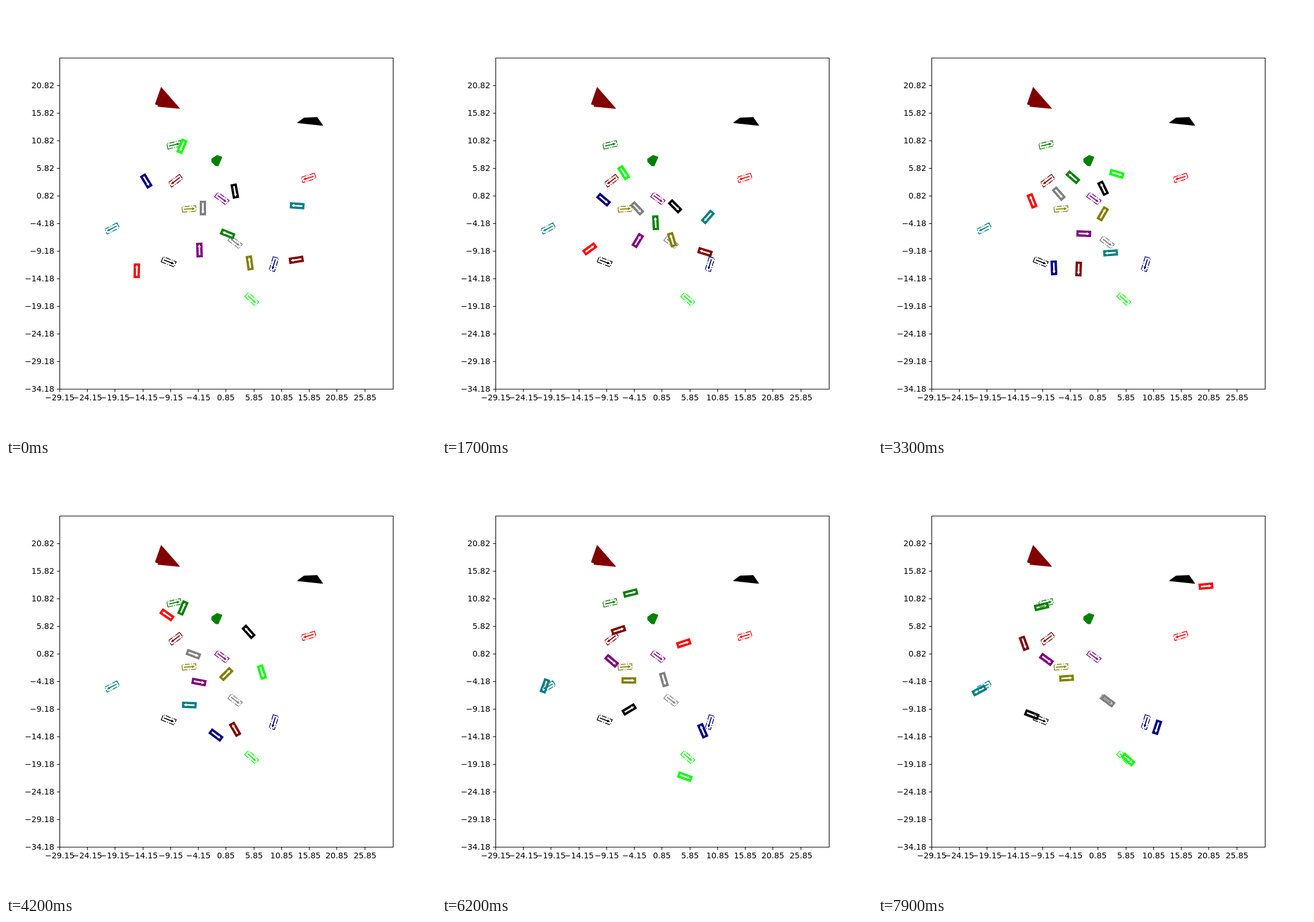
Animation, 748 px wide and 748 px high, one loop 8000 ms. Source, as an HTML page:

```html
<!DOCTYPE html>
<html lang="en">
<head>
<meta charset="utf-8">
<title>Vehicles driving to their goals</title>
<style>
html, body { margin: 0; width: 100%; height: 100%; overflow: hidden; background: #fff; }
svg { display: block; width: 100%; height: 100%; }
text { font: 13.89px "DejaVu Sans", sans-serif; }
</style>
</head>
<body>
<svg id="stage" viewBox="0 0 748 748"></svg>
<script>
const stage = document.getElementById('stage');
const LOOP = 8000, TICK = 100;
const TIMES = [0, 16, 32, 49, 61, 78];
const BOX = 'M-12.05 4.8H12.05V-4.8H-12.05Z';
const cars = [];

function add(tag, attrs, parent = stage) {
  const el = document.createElementNS('http://www.w3.org/2000/svg', tag);
  for (const k in attrs) el.setAttribute(k, attrs[k]);
  parent.appendChild(el);
  return el;
}

const place = (x, y, h) => `translate(${x} ${y}) rotate(${h})`;

function arrow(parent, fill, shaft, head) {
  add('path', { d: `M-9 ${-shaft}H5V${-head}L10 0L5 ${head}V${shaft}H-9Z`, fill }, parent);
}

function outline(parent, color, look) {
  add('path', { d: BOX, stroke: color, 'stroke-width': 1.39, ...look }, parent);
}

// Key poses are [x, y, heading, step]. The step defaults to the shared times,
// the heading to that of the goal.
function car(color, goal, ...poses) {
  let n = 0;
  const keys = poses.map(([x, y, h = goal[2], s]) => ({ x, y, h, s: s ?? TIMES[n++] }));
  const body = add('g', {});
  outline(body, color, { fill: color });
  arrow(body, '#fff', 1.4, 2.8);
  const mark = add('g', { transform: place(...goal) });
  outline(mark, color, { fill: 'none', 'stroke-dasharray': '8.9 2.2 1.4 2.2' });
  arrow(mark, color, 0.9, 2.5);
  cars.push({ body, keys });
}

const bezier = (a, b, c, d, u) => {
  const v = 1 - u;
  return v * v * v * a + 3 * v * v * u * b + 3 * v * u * u * c + u * u * u * d;
};

// Arc-like curve that leaves and arrives along the heading, forwards or in reverse.
function poseAt(keys, s) {
  let i = 0;
  while (i < keys.length - 2 && s >= keys[i + 1].s) i++;
  const a = keys[i], b = keys[i + 1], rad = Math.PI / 180;
  let u = (s - a.s) / (b.s - a.s);
  if (i === 0) u = u ** 1.8;
  const dx = b.x - a.x, dy = b.y - a.y;
  const mid = (a.h + b.h) / 2 * rad;
  const gear = Math.cos(mid) * dx + Math.sin(mid) * dy < 0 ? -1 : 1;
  const reach = gear * Math.hypot(dx, dy) / (3 * Math.cos((b.h - a.h) * rad / 4) ** 2);
  const along = (p, q, f) =>
    bezier(p, p + reach * f(a.h * rad), q - reach * f(b.h * rad), q, u);
  return [along(a.x, b.x, Math.cos), along(a.y, b.y, Math.sin), a.h + (b.h - a.h) * u];
}

function axes() {
  const L = 93.5, R = 673.5, T = 90.5, B = 666.5;
  const label = v => v.toFixed(2).replace('-', '\u2212');
  const line = d => add('path', { d, stroke: '#000', 'stroke-width': 1.11, fill: 'none' });
  for (let i = 0; i < 12; i++) {
    const x = Math.round(L + i * 48.23 - .5) + .5, y = B - i * 48;
    line(`M${x} ${B}v4.9M${L} ${y}h-4.9`);
    add('text', { x, y: 686, 'text-anchor': 'middle' }).textContent = label(-29.15 + 5 * i);
    add('text', { x: 84, y: y + 4.5, 'text-anchor': 'end' }).textContent = label(-34.18 + 5 * i);
  }
  line(`M${L} ${T}H${R}V${B}H${L}Z`);
}

function obstacle(fill, points) {
  add('polygon', { points, fill, stroke: fill, 'stroke-width': 1.39, 'stroke-linejoin': 'round' });
}

obstacle('maroon', '270,142 301.5,178 264.5,174.5 266,172.5 260,170.5');
obstacle('black', '507.5,203 518.5,195 541,194 550.5,207.5');
obstacle('green', '358,271 358,266 367,260 375.5,263 369,278 364.5,277.5');

car('gray', [398.5, 411, 37],
  [342.5, 351.5, 90], [339.5, 352, 47], [314.5, 326.5, 49], [338, 330, -5], [386, 375, 74], [400, 412]);
car('red', [526.5, 299, 163],
  [227.5, 460.5, -89], [257, 422.5, -36], [268, 339, -112], [280, 262.5, -145, 41],
  [254, 300, -358], [420.5, 312, -378], [570.5, 212.5, -365]);
car('maroon', [295, 304, 143],
  [505, 441.5, 171], [457.5, 428, 197], [349, 457.5, 92], [398.5, 461.5, -120, 41],
  [325, 385.5, -196], [307, 289, -18], [254, 312, 70]);
car('olive', [318.5, 353, -4],
  [424, 447, -98], [400, 406.5, -107], [391, 361.5, -60], [375, 367.5, -32], [325, 376.5, 0], [328, 372.5]);
car('green', [292.5, 241.5, -13],
  [385.5, 396.5, -158], [371.5, 377, -93], [339, 298, -139], [325.5, 225, -2], [328, 224.5, -14], [284.5, 248]);
car('lime', [427.5, 510, 42],
  [306, 244, 113], [316, 290, 57], [415.5, 292, 16], [403, 449, 123], [422.5, 544, 20], [435, 514]);
car('teal', [184.5, 387, 152],
  [506.5, 347.5, 184], [462.5, 367, 131], [404.5, 429.5, 176], [243, 402.5, 188], [179, 386, 110], [176, 394]);
car('navy', [466, 449, 107],
  [244, 304.5, 59], [281, 337, 40], [306, 455.5, 88], [457.5, 438.5, -9], [453.5, 464, 247], [485.5, 458, 468]);
car('purple', [375.5, 335, 36],
  [336.5, 424.5, -92], [340.5, 408, -59], [358, 396, 2], [316, 361.5, 18], [295, 342.5, 40], [293, 340]);
car('black', [283, 445, 21],
  [398, 322, 80], [405.5, 348.5, 45], [391.5, 317, -116], [422, 292, -132, 41],
  [423, 360, -70], [325.5, 427, -31], [267.5, 436]);
axes();

function draw() {
  const t = performance.now() % LOOP;
  const s = Math.max(0, Math.floor(t / TICK) - 1);
  for (const { body, keys } of cars) {
    body.setAttribute('transform', place(...poseAt(keys, s)));
  }
  requestAnimationFrame(draw);
}
draw();
</script>
</body>
</html>
```
